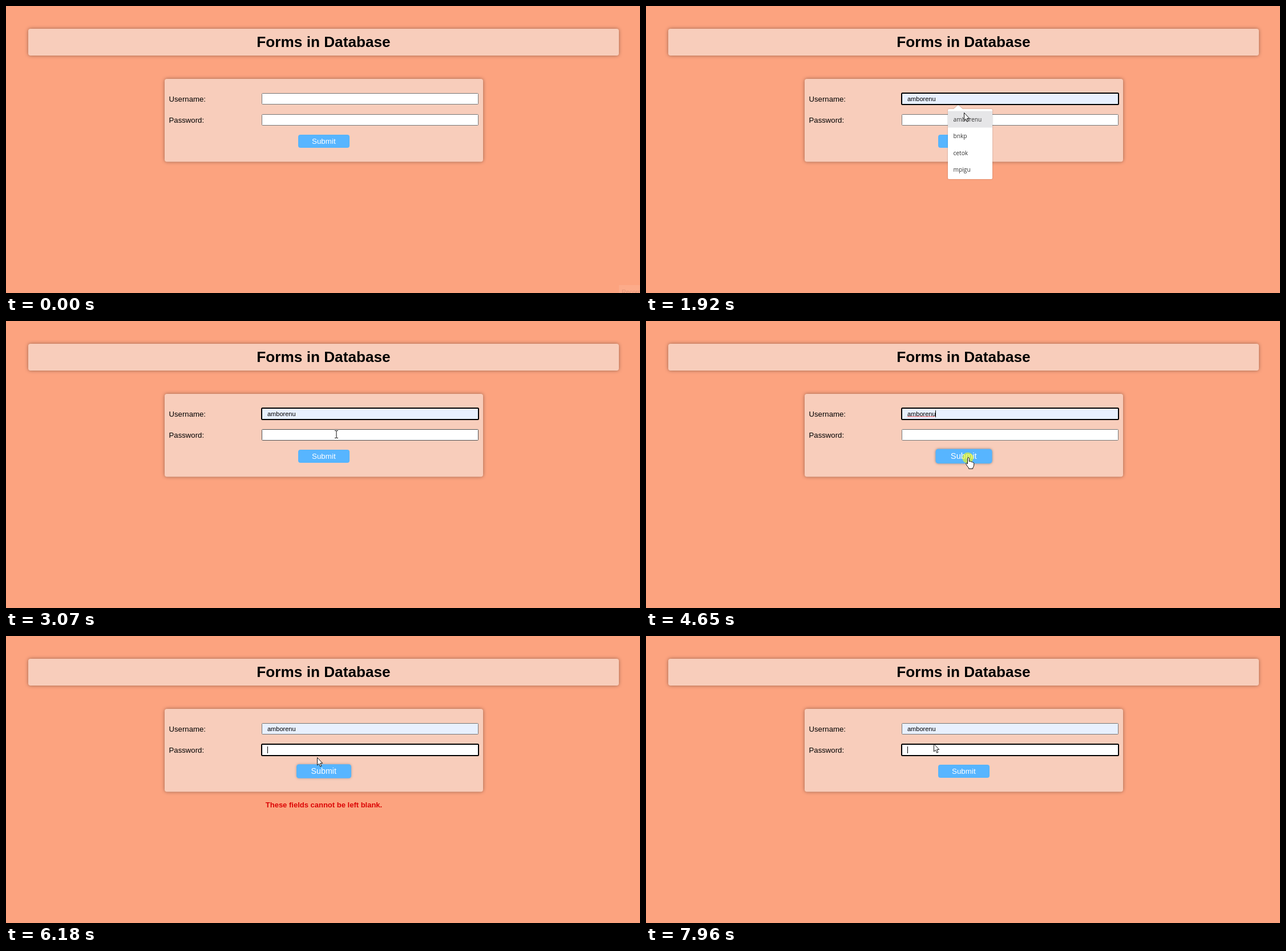
An HTML page for the animation above (8000 ms loop, 1111x504 px).

```html
<!DOCTYPE html>
<html lang="en">
<head>
<meta charset="utf-8">
<title>Forms in Database</title>
<style>
  html, body { margin: 0; width: 100%; height: 100%; overflow: hidden; background: #fca37f; }
  svg { display: block; width: 1111px; height: 504px; font: 13.2px "Liberation Sans", Arial, sans-serif; }
  .card { fill: #f8cdbb; filter: drop-shadow(0 0 3px rgba(0, 0, 0, .38)); }
  .mid { text-anchor: middle; }
  .field { stroke-width: 1; }
  .focus { fill: none; stroke: #000; stroke-width: 2; }
  .value { font-size: 11px; }
  #menu { font: 10.2px "Open Sans", "Noto Sans", sans-serif; fill: #333; }
  #panel { fill: #fff; filter: drop-shadow(0 0 1px rgba(0, 0, 0, .25)); }
  #error { font-weight: bold; font-size: 13px; fill: #dc0505; }
  #cursor path { stroke: #111; stroke-width: 1; stroke-linejoin: round; fill: #fff; }
</style>
</head>
<body>
<svg viewBox="0 0 1111 504">
  <rect width="1111" height="504" fill="#fca37f"/>
  <g id="corner">
    <rect x="1074" y="490" width="37" height="14" fill="#fcab8a"/>
    <text x="1079" y="506" font-size="10.5" fill="#e3977a">Record</text>
  </g>
  <rect class="card" x="39" y="40" width="1035" height="47" rx="4"/>
  <text class="mid" x="556.5" y="72" font-size="26.2" font-weight="bold">Forms in Database</text>
  <rect class="card" x="278" y="128" width="558" height="145.5" rx="4"/>
  <text x="285.5" y="168">Username:</text>
  <text x="285.5" y="204.500">Password:</text>

  <rect id="user" class="field" x="448.5" y="153.500" width="379" height="19" rx="1"/>
  <rect id="userFocus" class="focus" x="448" y="153" width="380" height="20" rx="1.500"/>
  <text id="name" class="value" x="458" y="167">amborenu</text>
  <path id="squiggle" d="M458 168.500l1.500-1.500" fill="none" stroke="#e33" stroke-width=".9"/>
  <rect id="pass" class="field" x="448.5" y="190.500" width="379" height="19" rx="1" fill="#fff"/>
  <rect id="passFocus" class="focus" x="448" y="190" width="380" height="20" rx="1.500"/>
  <rect id="caret" width="1" height="12"/>

  <g id="button">
    <rect x="512" y="226" width="90" height="23" rx="4" fill="#57b5ff"/>
    <text class="mid" x="556.800" y="242" fill="#fff" font-size="13.400">Submit</text>
  </g>
  <text id="error" class="mid" x="557" y="301">These fields cannot be left blank.</text>

  <g id="menu">
    <path id="panel" d="M531 181H539L547 174L555 181H605q2 0 2 2V302q0 2-2 2H531q-2 0-2-2V183q0-2 2-2Z"/>
    <rect id="row" x="529" y="184.500" width="78" height="29" fill="#e6e6e8"/>
    <text x="538.500" y="202.500">amborenu</text>
    <text x="538.500" y="232">bnkp</text>
    <text x="538.500" y="261.500">cetok</text>
    <text x="538.500" y="291">mpigu</text>
  </g>

  <g id="cursor">
    <circle id="ring" cx="-1" cy=".5" r="9.700" fill="#ff0" fill-opacity=".58"/>
    <path id="arrow" d="M.5.5V14L3.500 11.200 5.600 16.200 7.800 15.300 5.700 10.400H9.700Z"/>
    <path id="beam" style="fill:none" d="M-3-6.500H-1L0-5.800 1-6.500H3M0-5.800V5.800M-3 6.500H-1L0 5.800 1 6.500H3"/>
    <path id="hand" d="M-1.500 1.200a1.400 1.400 0 0 1 2.800 0V6.500q3-.6 3.400.8 2.400-.4 2.800 1 2-.2 2.200 1.400V13q-.4 3-2 5v1.500H.6V18q-3-3-4.600-6.500-.8-2 .8-2.200l1.700 1.600Z"/>
  </g>
</svg>
<script>
const LOOP = 8000;
const el = {};
document.querySelectorAll('[id]').forEach(node => el[node.id] = node);
el.squiggle.setAttribute('d', 'M458 168.500' + 'l1.500-1.500 1.500 1.500'.repeat(16));

// Pointer stops: time, x, y
const path = [
  [270, 1020, 391], [400, 720, 205], [530, 385, 30], [600, 322, 2], [700, 425, 95], [830, 520, 167],
  [1630, 520, 167], [1880, 552, 184], [2120, 581, 203], [2640, 581, 203], [2880, 579, 199],
  [4120, 579, 199], [4330, 572, 225], [4560, 564.500, 239.500],
  [5760, 564.500, 239.500], [6120, 549, 226], [6180, 545, 213], [6350, 515, 198], [6520, 505, 179],
  [6580, 505, 179], [6980, 505, 176], [7240, 505, 174], [7440, 505, 165],
  [7700, 505, 165], [7960, 504, 189]
];

const clamp = v => Math.max(0, Math.min(1, v));
const ramp = (t, from, to) => clamp((t - from) / (to - from));
const easeOut = p => 1 - (1 - p) ** 2;
const swing = p => .5 - Math.cos(p * Math.PI) / 2;
const within = (v, from, to) => v >= from && v < to;
const show = (node, on) => node.setAttribute('opacity', +on);
const fill = (node, color) => node.setAttribute('fill', color);

function pointer(t) {
  let i = path.findIndex(stop => stop[0] > t);
  if (i < 0) return path[path.length - 1].slice(1);
  if (i === 0) i = 1;
  const [a, b] = [path[i - 1], path[i]];
  const p = ramp(t, a[0], b[0]);
  return [a[1] + (b[1] - a[1]) * p, a[2] + (b[2] - a[2]) * p];
}

function caretShown(t) {
  if (t < 1230) return false;
  if (t < 1900) return t < 1760;
  if (t < 3070) return t >= 2480;
  if (t < 4780) return Math.floor((t - 3070) / 525) % 2 === 1;
  return Math.floor((t - 4785) / 529) % 2 === 0 || t < 4785;
}

function draw(t) {
  const [x, y] = pointer(t);
  const menu = ramp(t, 1230, 1310) * (1 - ramp(t, 2480, 2640));
  const overMenu = menu > 0 && y > 181;
  const inFields = within(x, 448, 828) && !overMenu;
  const overUser = t >= 270 && inFields && within(y, 153, 173);
  const overPass = inFields && within(y, 190, 210);
  const overButton = within(x, 510, 604) && within(y, 225, 250) && !overMenu;
  const filled = t >= 1900;
  const onUser = within(t, 1230, 4780);
  const onPass = t >= 4780;

  show(el.corner, t < 270);
  fill(el.user, filled ? '#e8f0fe' : '#fff');
  el.user.setAttribute('stroke', overUser ? '#515151' : '#767676');
  el.pass.setAttribute('stroke', overPass ? '#515151' : '#767676');
  show(el.userFocus, onUser);
  show(el.passFocus, onPass);
  show(el.name, filled);
  show(el.squiggle, within(t, 3530, 4780));
  show(el.caret, caretShown(t));
  el.caret.setAttribute('x', onUser && filled ? 507 : 458);
  el.caret.setAttribute('y', onPass ? 194 : 157);

  const hover = easeOut(ramp(t, 4330, 4630)) - easeOut(ramp(t, 6126, 6426));
  el.button.setAttribute('transform', `translate(557 237.5) scale(${1 + hover * .1}) translate(-557 -237.5)`);
  el.button.style.filter = hover > 0 ? `drop-shadow(0 0 2px rgba(80, 80, 80, ${hover * .6}))` : 'none';
  show(el.error, t >= 4780 ? 1 - swing(ramp(t, 6580, 6980)) : 0);

  show(el.menu, menu);
  show(el.row, filled);

  el.cursor.setAttribute('transform', `translate(${Math.round(x)} ${Math.round(y)})`);
  show(el.cursor, t >= 270);
  show(el.ring, within(t, 1230, 1370) || within(t, 2320, 2480) || within(t, 4600, 4780));
  const beam = overUser || overPass;
  show(el.beam, beam);
  show(el.hand, overButton);
  show(el.arrow, !beam && !overButton);
}

function tick() {
  draw(performance.now() % LOOP);
  requestAnimationFrame(tick);
}
tick();
</script>
</body>
</html>
```
